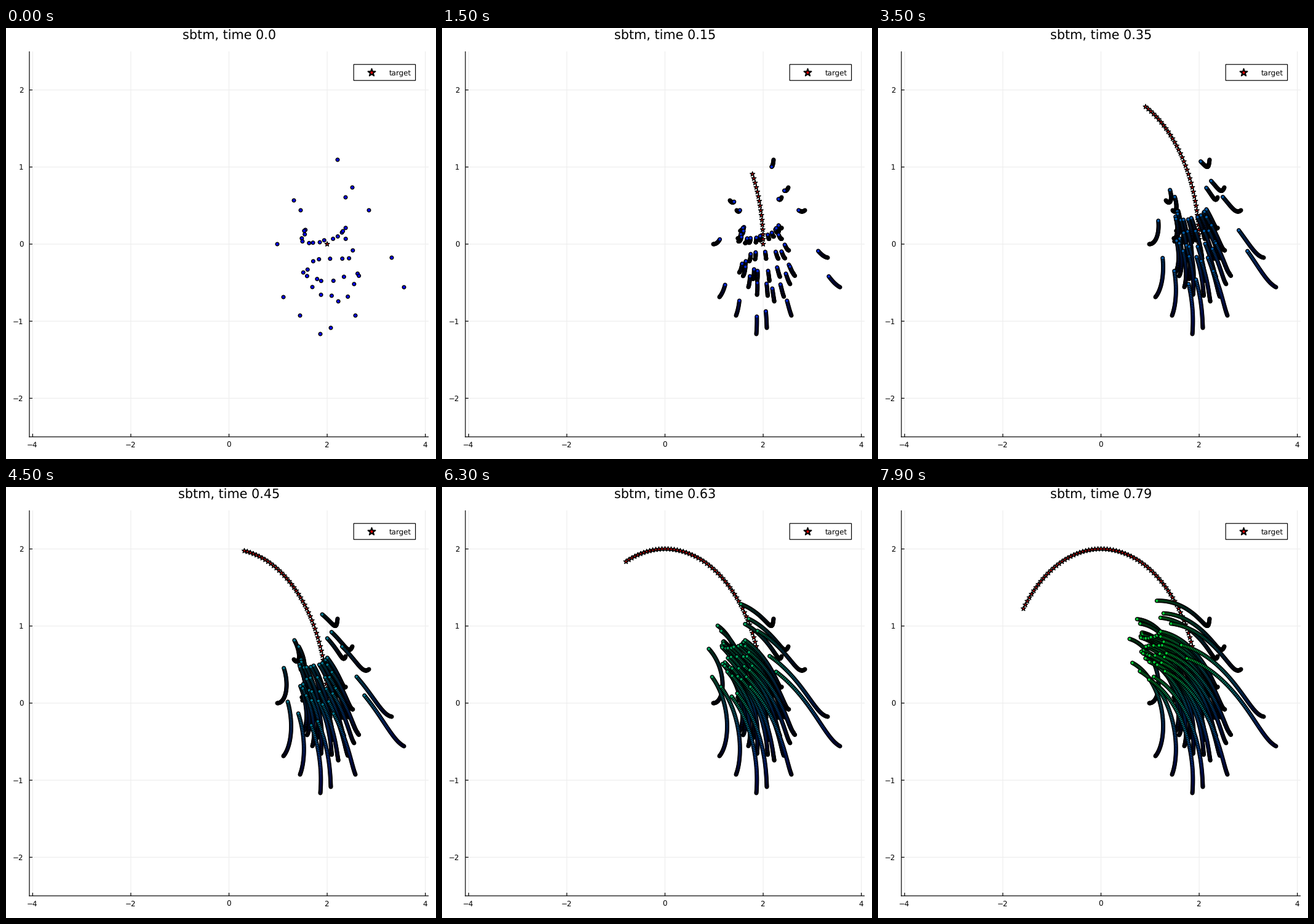
These frames come from a looping animation (699x700 px, 8 s). A matplotlib script:

```python
import numpy as np
import matplotlib.pyplot as plt
from matplotlib.animation import FuncAnimation
from matplotlib.collections import PathCollection
from matplotlib.patches import Rectangle
from matplotlib.path import Path
from matplotlib.transforms import IdentityTransform

W, H, DPI = 699, 700, 64
PX = 72 / DPI                      # points per pixel
STEPS, DT = 80, 0.01
LEFT, RIGHT, TOP, BOTTOM = 38, 687, 38, 664
X0, Y0 = (LEFT + RIGHT) / 2, (TOP + BOTTOM) / 2
SX, SY = 79.79, (BOTTOM - TOP) / 5
N_CORE = 36

plt.rcParams["font.family"] = "DejaVu Sans"
plt.rcParams["text.hinting"] = "none"

# Key points of the particle cloud, x + iy in stage pixels:
# stragglers on the rim, and a winding path that the core is strewn along
RIM = [539+214j, 563+259j, 552+275j, 590+296j, 627+373j, 647+421j, 568+467j,
       528+487j, 511+497j, 478+467j, 451+437j, 441+351j, 468+280j, 479+296j]
CORE = [488+326j, 479+343j, 503+351j, 537+342j, 550+321j, 563+376j,
        509+374j, 480+400j, 522+411j, 582+396j, 546+447j, 496+421j]


def to_px(z):
    return np.column_stack([X0 + SX * z.real, Y0 - SY * z.imag])


def star(r):
    a = np.pi / 2 + np.arange(11) * np.pi / 5
    rad = np.where(np.arange(11) % 2, 0.382 * r, r)
    return Path(np.column_stack([rad * np.cos(a), rad * np.sin(a)]), closed=True)


def cloud():
    rng = np.random.default_rng(4)
    u = np.linspace(0, len(CORE) - 1, N_CORE)
    core = np.interp(u, np.arange(len(CORE)), CORE)
    core = core + rng.normal(0, 2, N_CORE) + 1j * rng.normal(0, 2, N_CORE)
    p = np.concatenate([core, RIM])
    return (p.real - X0) / SX + 1j * (Y0 - p.imag) / SY


def simulate(z):
    """Particles chase a target that circles the origin."""
    spots, colors = [], []
    for k in range(STEPS):
        t = k * DT
        target = 2 * np.exp(1j * np.pi * t)
        spots.append(to_px(np.append(target, z)))
        colors += [(1, 0, 0)] + [(0, t, 1 - t)] * len(z)
        z = z + DT * (target - z)
    return np.vstack(spots), colors


fig = plt.figure(figsize=(W / DPI, H / DPI), dpi=DPI, facecolor="white")
ax = fig.add_axes([0, 0, 1, 1])
ax.set_xlim(0, W)
ax.set_ylim(H, 0)
ax.axis("off")


def line(xs, ys, color="black", z=3):
    ax.plot(xs, ys, color=color, lw=1.2 * PX, zorder=z, snap=False,
            solid_capstyle="butt")


def label(x, y, s, size=11.85, ha="center"):
    return ax.text(x, y, s, fontsize=size * PX, ha=ha, va="baseline", zorder=6)


def markers(paths, spots, colors, width, z):
    c = PathCollection(paths, offsets=spots, offset_transform=ax.transData,
                       transform=IdentityTransform(), facecolors=colors,
                       edgecolors="black", linewidths=width * PX, zorder=z)
    c.set_joinstyle("round")
    ax.add_collection(c, autolim=False)
    return c


def number(v):
    return str(v).replace("-", "\u2212")


for v in range(-4, 5, 2):
    x = X0 + SX * v
    line([x, x], [TOP, BOTTOM], "#eeeeee", 1)
    line([x, x], [BOTTOM, BOTTOM - 5])
    label(x - 0.7, 681.2, number(v))
for v in range(-2, 3):
    y = Y0 - SY * v
    line([LEFT, RIGHT], [y, y], "#eeeeee", 1)
    line([LEFT, LEFT + 5], [y, y])
    label(28.6, y + 4.6, number(v), ha="right")
line([LEFT, LEFT], [TOP, BOTTOM + 0.6])
line([LEFT - 0.6, RIGHT], [BOTTOM, BOTTOM])

ax.add_patch(Rectangle((565.2, 59.2), 100.4, 26, fc="white", ec="black",
                       lw=1.2 * PX, snap=False, zorder=4))
markers([star(6.3)], [(594, 72.2)], ["red"], 2, 5)
label(622.8, 76.7, "target", ha="left")

title = label(362.6, 18.2, "", 20.75)
start = cloud()
spots, colors = simulate(start)
group = len(start) + 1
paths = [star(4)] + [Path.circle((0, 0), 2.8)] * len(start)
trail = markers(paths, spots[:group], colors, 1.4, 2)


def update(k):
    trail.set_offsets(spots[:(k + 1) * group])
    title.set_text(f"sbtm, time {round(k * DT, 2)}")
    return trail, title


anim = FuncAnimation(fig, update, frames=STEPS, interval=100, repeat=True,
                     repeat_delay=0, blit=False)
plt.show()
```
